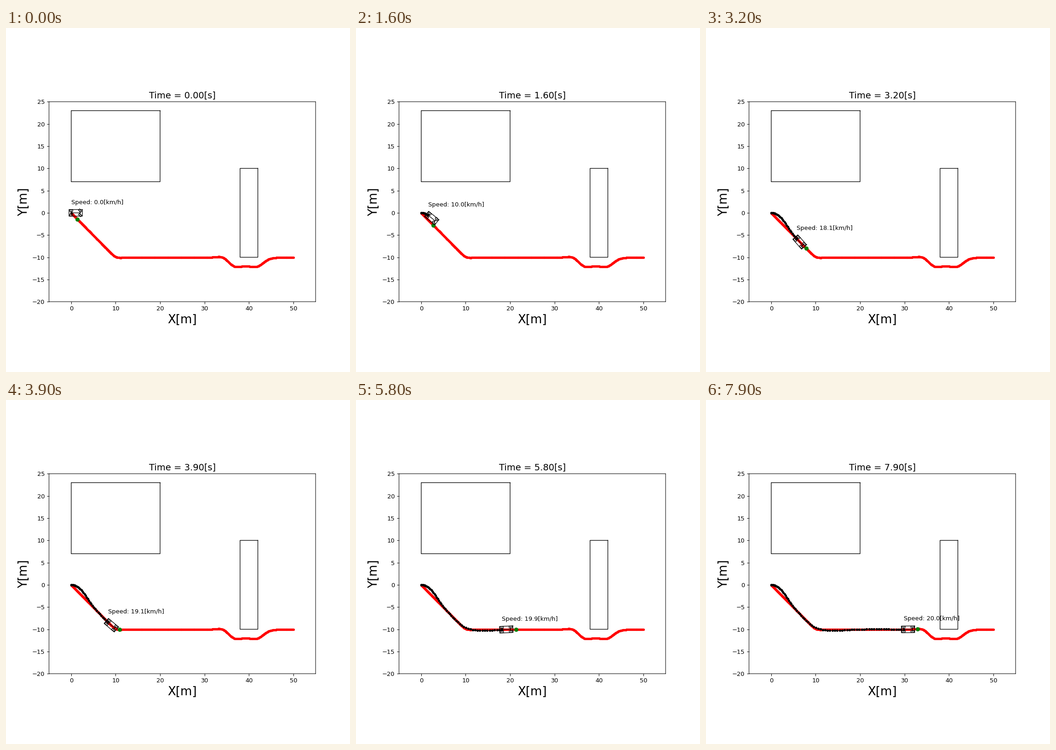
A matplotlib script that plays this animation: 748x748 px, repeating every 8 s.

```python
import numpy as np
import matplotlib.pyplot as plt
from matplotlib.animation import FuncAnimation

# Lines fall on fractional pixels, so leave them unsnapped.
plt.rcParams["path.snap"] = False

FRAMES, DT = 80, 0.1
TARGET_SPEED = 20 / 3.6
WHEEL_BASE = 2.0
MAX_STEER = np.radians(45)

# Corners of the course before rounding
CORNERS = [(-2, 2), (10, -10.15), (14, -10), (28, -10), (30.5, -10.1),
           (34.15, -9.8), (36.6, -12.3), (39.3, -11.95), (41.9, -12.3),
           (44.4, -10.3), (47, -10), (52, -10)]


def build_course(corners, length=50, reach=1.5, step=0.1):
    """Round the corners with a triangular blur, then sample evenly."""
    px, py = np.transpose(corners)
    x = np.linspace(0, length, 2001)
    offsets = np.linspace(-reach, reach, 61)
    weights = reach - abs(offsets)
    y = np.interp(x[:, None] + offsets, px, py) @ weights / weights.sum()
    s = np.append(0, np.cumsum(np.hypot(np.diff(x), np.diff(y))))
    even = np.append(np.arange(0, s[-1], step), s[-1])
    return np.interp(even, s, x), np.interp(even, s, y)


def simulate(cx, cy):
    """Pure pursuit run: rows of x, y, yaw, speed, steer, goal index."""
    x = y = yaw = speed = 0.0
    rows = []
    for k in range(FRAMES):
        look = 2.0 + 0.3 * speed
        dist = np.hypot(cx - x, cy - y)
        i = int(dist.argmin())
        while dist[i] < look and i + 1 < len(cx):
            i += 1
        alpha = np.arctan2(cy[i] - y, cx[i] - x) - yaw
        steer = np.arctan2(2 * WHEEL_BASE * np.sin(alpha), look)
        steer = np.clip(steer, -MAX_STEER, MAX_STEER)
        # Acceleration builds up, then follows the speed error.
        accel = min(0.435 + 0.153 * k, TARGET_SPEED - speed) if k else 0.0
        move = speed * DT + accel * DT ** 2 / 2
        x += move * np.cos(yaw)
        y += move * np.sin(yaw)
        yaw += speed * np.tan(steer) / WHEEL_BASE * DT
        speed += accel * DT
        rows.append((x, y, yaw, speed, steer, i))
    return np.array(rows)


def box(x0, x1, y0, y1):
    return np.array([[x1, x1, x0, x0, x1], [y1, y0, y0, y1, y1]], float)


def place(shape, x, y, angle):
    c, s = np.cos(angle), np.sin(angle)
    return np.array([[c, -s], [s, c]]) @ shape + [[x], [y]]


def car_parts(x, y, yaw, steer):
    tire = box(-0.35, 0.35, -0.2, 0.2)
    axle = np.array([[0, 0], [0.5, -0.5]])
    parts = [box(-0.5, 2.5, -0.75, 0.75),
             np.array([[0, WHEEL_BASE], [0, 0]])]
    for wx, turn in ((0, 0), (WHEEL_BASE, steer)):
        parts.append(axle + [[wx], [0]])
        parts += [place(tire, wx, wy, turn) for wy in (0.5, -0.5)]
    return [place(p, x, y, yaw) for p in parts]


course_x, course_y = build_course(CORNERS)
run = simulate(course_x, course_y)

fig = plt.figure(figsize=(8, 8), dpi=93.5)
ax = fig.add_subplot(111)
ax.set_aspect("equal")
ax.set_xlim(-5, 55)
ax.set_ylim(-20, 25)
ax.set_xlabel("X[m]", fontsize=20)
ax.set_ylabel("Y[m]", fontsize=20)
title = ax.set_title("", fontsize=15)

for obstacle in (box(0, 20, 7, 23), box(38, 42, -10, 10)):
    ax.plot(*obstacle, "k-", lw=1)
ax.plot(course_x, course_y, "r.")
goal, = ax.plot([], [], "o", color="g")
trail, = ax.plot([], [], "k.")
car = [ax.plot([], [], "k-", lw=1)[0] for _ in range(8)]
label = ax.text(0, 0, "", fontsize=10)


def update(k):
    x, y, yaw, speed, steer, i = run[k]
    title.set_text(f"Time = {k * DT:.2f}[s]")
    goal.set_data([course_x[int(i)]], [course_y[int(i)]])
    trail.set_data(run[:k + 1, 0], run[:k + 1, 1])
    for line, part in zip(car, car_parts(x, y, yaw, steer)):
        line.set_data(*part)
    label.set_position((x, y + 2))
    label.set_text(f"Speed: {speed * 3.6:.1f}[km/h]")
    return [title, goal, trail, label, *car]


anim = FuncAnimation(fig, update, frames=FRAMES, interval=100,
                     repeat=True, repeat_delay=0, blit=False)
plt.show()
```
